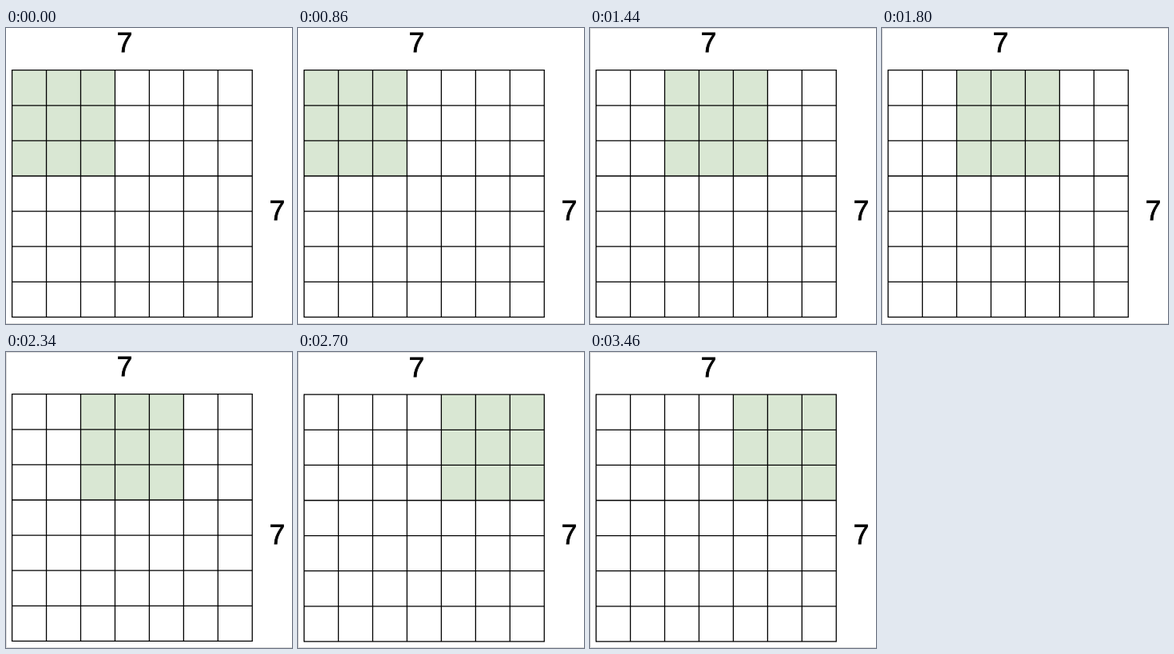
Write an HTML page with a canvas that moves like this. It is 358 px wide and 370 px high and loops after 3.96 s.

```html
<!DOCTYPE html>
<html lang="en">
<head>
<meta charset="utf-8">
<style>
  html, body { margin: 0; width: 100%; height: 100%; overflow: hidden; background: #fff; }
  canvas { display: block; }
</style>
</head>
<body>
<canvas id="stage" width="358" height="370"></canvas>
<script>
const ctx = document.getElementById('stage').getContext('2d');
const LOOP = 3960;
const CELLS = 7, WINDOW = 3;
const LEFT = 7.6, TOP = 52.7, CELL_W = 42.95, CELL_H = 44.1, LINE = 1.3;

// Each step moves the window two columns; the last sits slightly lower.
const steps = [
  { start: 0, column: 0, drop: 0, framed: false },
  { start: 1440, column: 2, drop: 0, framed: true },
  { start: 2700, column: 4, drop: 0.5, framed: true }
];

const lineX = i => LEFT + i * CELL_W;
const lineY = i => TOP + i * CELL_H;

function fill(color, x, y, w, h) {
  ctx.fillStyle = color;
  ctx.fillRect(x, y, w, h);
}

function drawGrid() {
  ctx.beginPath();
  for (let i = 0; i <= CELLS; i++) {
    ctx.moveTo(lineX(i), TOP);
    ctx.lineTo(lineX(i), lineY(CELLS));
    ctx.moveTo(LEFT, lineY(i));
    ctx.lineTo(lineX(CELLS), lineY(i));
  }
  ctx.strokeStyle = '#000';
  ctx.lineWidth = LINE;
  ctx.lineCap = 'square';
  ctx.stroke();
}

function drawLabel(cx, baseline) {
  ctx.fillStyle = '#000';
  ctx.lineWidth = 0.8;
  ctx.font = '35px "Liberation Sans", Arial, sans-serif';
  ctx.textAlign = 'center';
  ctx.fillText(CELLS, cx, baseline);
  ctx.strokeText(CELLS, cx, baseline);
}

function draw(time) {
  const step = steps.findLast(s => time >= s.start);
  fill('#fff', 0, 0, 358, 370);
  fill('#d9d9d9', 0, 369, 358, 1);
  if (step.framed) {
    fill('#dcdcdc', 0, 0, 358, 1);
    fill('#dcdcdc', 0, 0, 1, 370);
  }

  ctx.save();
  ctx.translate(0, step.drop);
  fill('#d9e7d3', lineX(step.column), TOP, WINDOW * CELL_W, WINDOW * CELL_H);
  drawGrid();
  drawLabel(148.4, 30);
  drawLabel(339.4, 239.6);
  ctx.restore();
}

function tick() {
  draw(performance.now() % LOOP);
  requestAnimationFrame(tick);
}
tick();
</script>
</body>
</html>
```
